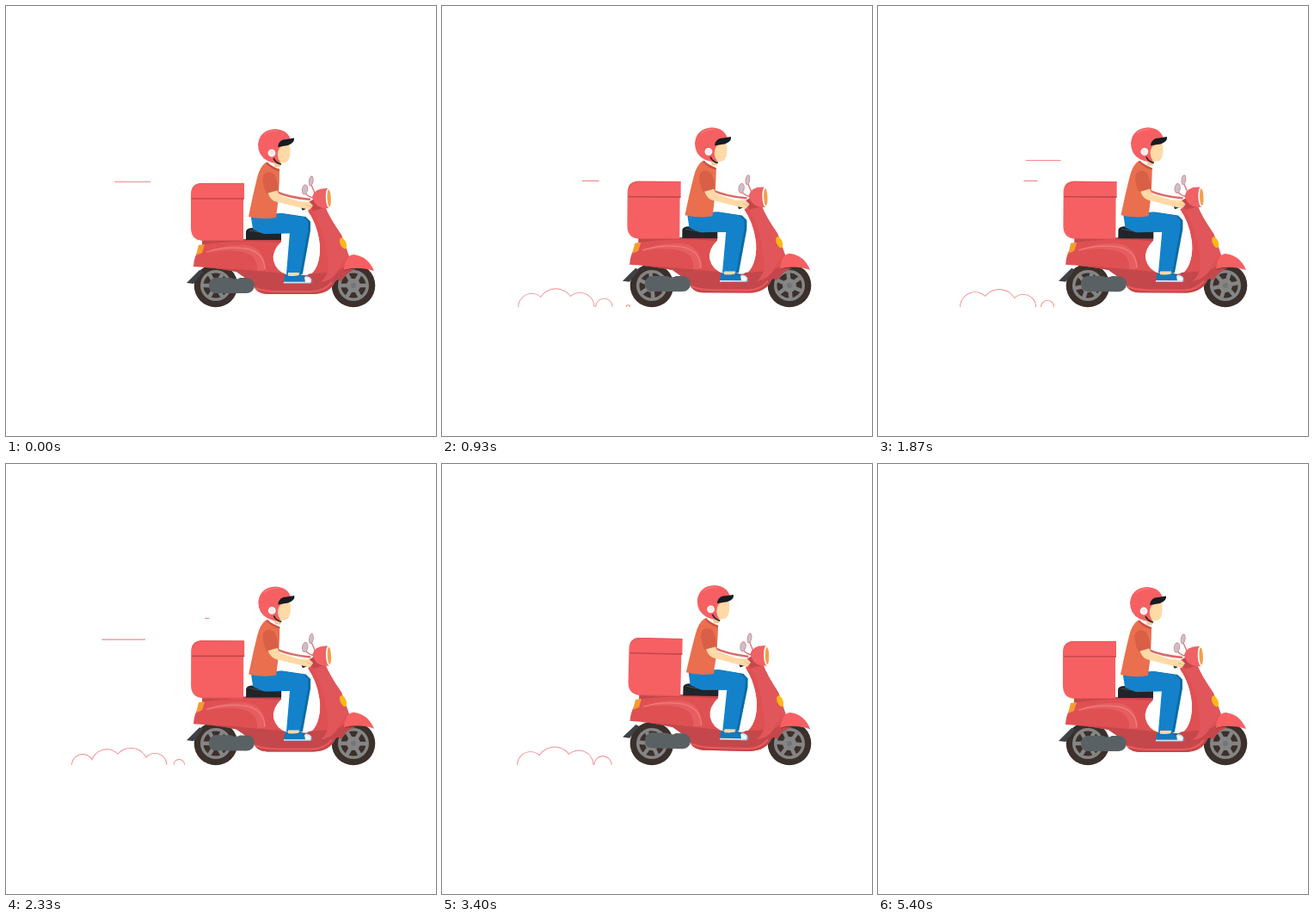
Recreate the animation shown at these times as an HTML page with a canvas. Size 500 by 500 pixels, loop 5470 ms.

```html
<!DOCTYPE html>
<html lang="en">
<head>
<meta charset="utf-8">
<title>Scooter delivery</title>
<style>
html, body { margin: 0; width: 100%; height: 100%; overflow: hidden; background: #fff; }
canvas { display: block; width: 100vw; height: 100vh; }
</style>
</head>
<body>
<canvas id="stage" width="500" height="500"></canvas>
<script>
const ctx = document.getElementById('stage').getContext('2d');
const LOOP = 5470, STEP = LOOP / 82, TAU = Math.PI * 2;
const RED = '#f66062', BODY = '#df5053', DARK = '#c4474b', SKIN = '#ffd9a6';
const BLUE = '#1482cb', NAVY = '#0b6ca4', SHIRT = '#e96f4f', BLACK = '#212529';

const clamp = v => Math.min(1, Math.max(0, v));
const lerp = (a, b, k) => a + (b - a) * k;
const ease = (t, from, to) => {
  const k = clamp((t - from) / (to - from));
  return k * k * (3 - 2 * k);
};

function fill(d, color) {
  ctx.fillStyle = color;
  ctx.fill(new Path2D(d));
}
function line(d, color, width) {
  ctx.strokeStyle = color;
  ctx.lineWidth = width;
  ctx.stroke(new Path2D(d));
}
function oval(x, y, rx, ry, color, turn = 0) {
  ctx.fillStyle = color;
  ctx.beginPath();
  ctx.ellipse(x, y, rx, ry, turn, 0, TAU);
  ctx.fill();
}
function group(x, y, turn, draw, dx = 0, dy = 0) {
  ctx.save();
  ctx.translate(x + dx, y + dy);
  ctx.rotate(turn);
  ctx.translate(-x, -y);
  draw();
  ctx.restore();
}

function wheel(x, y, turn) {
  oval(x, y, 25.3, 25.3, '#3b302b');
  oval(x, y, 18, 18, '#858585');
  oval(x, y, 14.5, 14.5, '#3b302b');
  group(x, y, turn, () => {
    ctx.strokeStyle = '#858585';
    ctx.lineWidth = 4.5;
    ctx.beginPath();
    for (let i = 0; i < 6; i++) {
      const a = i * TAU / 6;
      ctx.moveTo(x, y);
      ctx.lineTo(x + 16 * Math.cos(a), y + 16 * Math.sin(a));
    }
    ctx.stroke();
  });
  oval(x, y, 8, 8, '#858585');
  oval(x, y, 3, 3, '#757575');
}

// Puffs leave the exhaust, swell, then shrink a little and vanish.
function smoke(t) {
  const puffs = [];
  for (let i = 0; i < 19; i++) {
    const age = t - 234 - 164 * i, x = 224 - 0.171 * age;
    if (age < 0 || x < 86) continue;
    const r = x > 134 ? 22 * (1 - ((x - 134) / 92) ** 1.2) : 22 - 0.2 * (134 - x);
    puffs.push([x, Math.max(r, 1)]);
  }
  ctx.save();
  ctx.beginPath();
  ctx.rect(0, 300, 500, 50);
  ctx.clip();
  for (const [x, r] of puffs) oval(x, 350, r, r, '#f58a8c');
  for (const [x, r] of puffs) oval(x, 350, Math.max(r - 0.9, 0), Math.max(r - 0.9, 0), '#fff');
  ctx.restore();
}

function streaks(t, x, y, births) {
  for (const birth of births) {
    const age = t - birth;
    if (age <= 0 || age >= 990) continue;
    const head = x - 92 * clamp(age / 740);
    const tail = x - 37 * clamp(age / 740) - 55 * clamp((age - 740) / 250);
    line(`M${head} ${y}H${tail}`, '#f2898d', 1.2);
  }
}

function scooter() {
  // Rack, tail and footboard
  fill('M228 271H320V278H228Z', DARK);
  fill('M225 307L210 322L218 323L229 309Z', '#3d4247');
  fill('M218 303Q219 284 232 277Q270 271 320 275L318 304L352 314Q366 305 365 278Q362 255 351 238L356 233H371Q376 246 390 266L399 291Q396 310 383 320Q377 334 358 335H304Q289 334 288 323L268 309Q242 304 218 303Z', BODY);
  fill('M218 303Q260 305 302 309Q344 314 380 309Q388 308 394 303Q391 316 383 320Q377 334 358 335H304Q289 334 288 323L268 309Q242 304 218 303Z', DARK);
  line('M290 328Q300 332 318 332H355Q370 332 379 321', '#ea5a5d', 2);
  fill('M233 287Q250 277 278 278Q301 280 302 307L292 308Q293 290 276 286Q257 282 233 287Z', '#e65e60');
  line('M233 286Q254 279 279 282Q300 286 301 306', '#f27b7b', 1.3);
  fill('M224 278L231 277L228 287L221 290Z', '#f59b2e');
  fill('M320 274Q309 285 311 296Q314 309 328 313H350Q364 306 365 284Q365 262 354 243L346 256L321 260Z', '#fff');
  fill('M279 262Q280 258 287 258L320 262V272H279Z', BLACK);
  line('M283 261Q300 265 319 264', '#46505a', 1);
  // Front
  fill('M357 240Q372 264 375 304Q374 314 366 321Q382 319 388 303L398 290L387 262Q376 249 371 234Z', '#e1565a');
  fill('M393 307Q394 290 404 289Q421 291 428 308Q409 302 393 307Z', RED);
  fill('M384 318Q390 304 407 306Q396 309 390 320Z', DARK);
  oval(392, 276, 3.4, 6.8, '#fbb914', -0.4);
  line('M348 217Q350 222 361 224M355 208L361 222', '#d9757b', 1.4);
  oval(347.5, 213.5, 3.6, 6, '#d7868d', 0.15);
  oval(347.5, 213.5, 2.7, 5, '#c9c0c9', 0.15);
  oval(354.7, 203.5, 2.8, 6, '#d7868d', 0.15);
  oval(354.7, 203.5, 2, 5, '#c9c0c9', 0.15);
  fill('M352 228L362 222L372 234L357 238Z', DARK);
  fill('M356 222Q359 211 374 212L376 235Q360 237 356 222Z', '#ef6266');
  oval(375, 223.5, 3.2, 11.5, '#fff', -0.05);
  oval(375.7, 223.5, 2.2, 10, '#f2a04a', -0.05);
  // Exhaust
  fill('M243 316H261Q268 319 272 316H280A9 9 0 0 1 280 334H243Q236 333 236 325Q236 318 243 316Z', '#5a6165');
  // Box
  fill('M226 206H277V224H276V273H229Q215 272 215 258V219Q215 207 226 206Z', RED);
  line('M216 224H277', DARK, 1.7);
  line('M217 214Q219 207 227 206.5H276.5M228 272.5H276', '#e4575a', 1);
}

const BENT = [286,246, 318,242, 345,246, 350,251, 350,261, 341,311, 327,311, 331,263, 300,264, 288,259];
const DOWN = [287,246, 312,248, 330,267, 336,274, 336,283, 333,337, 321,337, 320,281, 298,265, 288,254];

function leg(k, color) {
  ctx.beginPath();
  for (let i = 0; i < BENT.length; i += 2)
    ctx.lineTo(lerp(BENT[i], DOWN[i], k), lerp(BENT[i + 1], DOWN[i + 1], k));
  ctx.closePath();
  ctx.lineJoin = 'round';
  ctx.fillStyle = ctx.strokeStyle = color;
  ctx.lineWidth = 2;
  ctx.fill();
  ctx.stroke();
}

function shoe(dx, dy, color) {
  group(0, 0, 0, () => {
    fill('M328 310H341L340 315H328Z', SKIN);
    fill('M324 313Q333 315 341 313L352 317Q355 319 354 322H323Z', color);
    fill('M347 315Q355 316 354 321H348Z', '#fff');
    line('M323 321.5H354', '#e9f1f7', 1.6);
    line('M348 315Q355 316 355 322H324', '#7fb9de', 0.5);
  }, dx, dy);
}

function head() {
  fill('M310 178L321 178L319 187L313 187Z', '#f5c891');
  fill('M315 162H330Q332 176 327 181Q321 184 314 180Z', SKIN);
  fill('M318 165Q313 173 319 182Q312 184 304 180Q293 174 293 161Q295 144 313 143Q328 144 331 156Z', RED);
  line('M300 150Q306 145 315 145', '#fb8182', 1);
  fill('M316 164Q317 155 326 155L335 153.5Q336 159 328 162Z', '#171c22');
  line('M311 177Q314 183 320 184', '#30272a', 1.7);
  oval(309, 171, 4.4, 4.4, '#fff');
  oval(309, 171, 3, 3, '#fbeaea');
}

function rider(foot, lean) {
  group(0, 0, 0, () => leg(0, NAVY), 3, 0);
  shoe(1, -1, NAVY);
  leg(foot, BLUE);
  shoe(-3.5 * foot, 25.5 * foot, '#1679bb');

  line('M314 216Q330 223 354 225', '#d96b69', 2.5);
  group(312, 162, -0.2 * lean, head, -13 * lean, -lean);
  group(299, 245, -0.07 * lean, () => {
    fill('M302 182L318 190Q318 218 314 246Q299 249 282 245Q287 220 292 200Q295 187 302 182Z', SHIRT);
    line('M303 182Q309 189 318 191', '#c94f40', 2);
  });

  const s = -2 * lean;
  line('M344 236L351 233', BLACK, 4);
  fill(`M${304 + s} 214L${315 + s} 214L318 220L340 227L353 228L357 232L353 237L336 233L312 227Q305 223 ${304 + s} 214Z`, SKIN);
  line('M349 231L356 234', '#e8b67d', 0.8);
  group(299, 245, -0.07 * lean, () =>
    fill('M299 197Q304 190 312 196Q316 204 317 214L303 218Q297 207 299 197Z', '#d95f46'));
}

function draw(now) {
  const t = Math.floor((now % LOOP + 4) / STEP) % 82 * STEP;
  const slow = clamp((t - 3200) / 600);
  const spin = (Math.min(t, 3200) + 600 * (slow - slow * slow / 2)) * 4 * TAU / 3500;
  const bob = t < 3200 ? (1 - Math.cos(TAU * t / 400)) / 2 : 0;
  const brake = Math.sin(Math.PI * clamp((t - 3200) / 550));
  const foot = ease(t, 3700, 4030) - ease(t, 4800, 5400);
  const sway = 0.07 * Math.sin(Math.PI * clamp((t - 4130) / 740));
  const lean = foot * (1 + sway);

  ctx.fillStyle = '#fff';
  ctx.fillRect(0, 0, 500, 500);
  streaks(t, 240, 179.5, [1320, 2265]);
  streaks(t, 196, 204.5 - 1.5 * bob, [-560, 666, 1654, 2360]);
  smoke(t);
  wheel(244, 325, spin);
  wheel(404, 325, spin);
  group(404, 325, 0.025 * brake + 0.008 * bob, () => {
    scooter();
    rider(foot, lean);
  }, 0, -1.5 * bob);
}

function tick() {
  draw(performance.now());
  requestAnimationFrame(tick);
}
tick();
</script>
</body>
</html>
```
